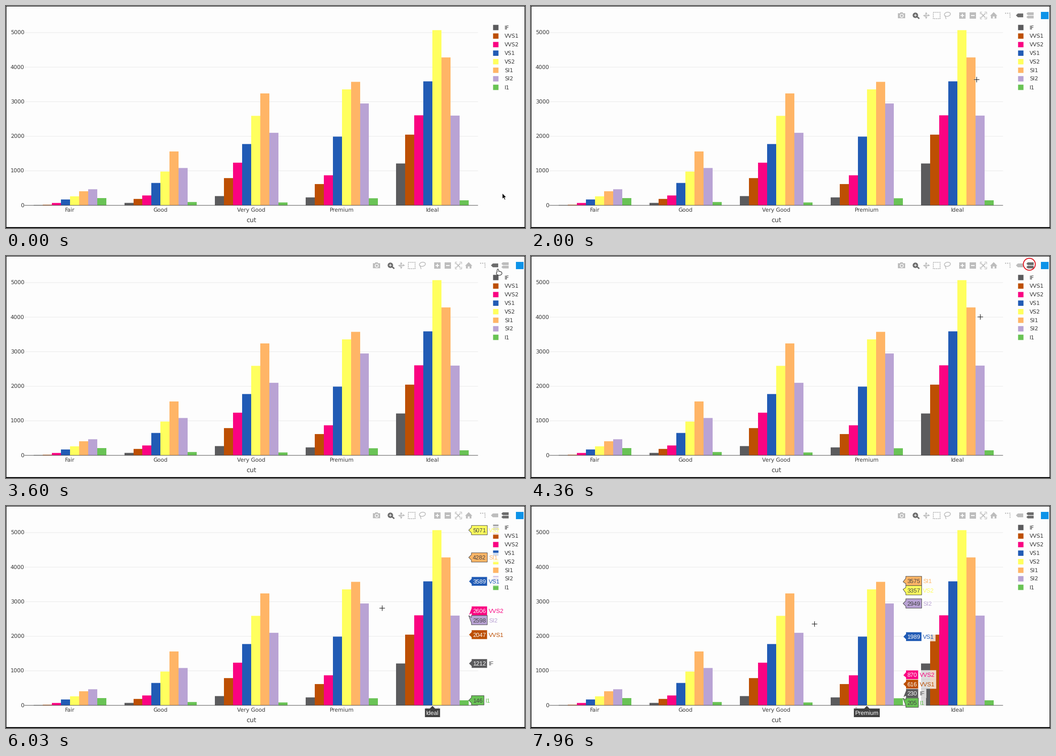
These frames come from a looping animation (1143x490 px, 8000 ms). A matplotlib script:

```python
import itertools

import matplotlib.pyplot as plt
import numpy as np
from matplotlib.animation import FuncAnimation
from matplotlib.lines import Line2D
from matplotlib.patches import Circle, Ellipse, Polygon, Rectangle
from matplotlib.text import Text
from matplotlib.transforms import Affine2D

W, H, DPI = 1143, 490, 64
PX = 72 / DPI
LOOP, STEP = 8000, 20

BG, INK, DARK = "#fdfdfd", "#3a3a3a", "#444444"
IDLE, ACTIVE = "#bdbdbd", "#6c6c6c"

# Diamonds counted by clarity, one row per cut
CLARITY = ["IF", "VVS1", "VVS2", "VS1", "VS2", "SI1", "SI2", "I1"]
COLORS = ["#5b5b5d", "#bd4f03", "#fa0382", "#215bb5",
          "#ffff5e", "#ffb566", "#b9a3d4", "#69c355"]
COUNTS = {
    "Fair": [9, 17, 69, 170, 261, 408, 466, 210],
    "Good": [71, 186, 286, 648, 978, 1560, 1081, 96],
    "Very Good": [268, 789, 1235, 1775, 2591, 3240, 2100, 84],
    "Premium": [230, 616, 870, 1989, 3357, 3575, 2949, 205],
    "Ideal": [1212, 2047, 2606, 3589, 5071, 4282, 2598, 146],
}
CUTS = list(COUNTS)

LEFT, RIGHT, BASE = 41, 1039, 440
GROUP = (RIGHT - LEFT) / len(CUTS)
BAR = 0.8 * GROUP / len(CLARITY)

plt.rcParams["text.hinting"] = "none"
fig = plt.figure(figsize=(W / DPI, H / DPI), dpi=DPI, facecolor=BG)
ax = fig.add_axes([0, 0, 1, 1])
ax.set(xlim=(0, W), ylim=(H, 0))
ax.axis("off")
layer = itertools.count(1)


def put(artist):
    """Add an artist on top of everything placed so far."""
    artist.set_zorder(next(layer))
    ax.add_artist(artist)
    return artist


def box(x0, y0, x1, y1, color, **kw):
    return put(Rectangle((x0, y0), x1 - x0, y1 - y0, fc=color, lw=0,
                         snap=False, **kw))


def shape(points, color, edge="none", width=0, **kw):
    return put(Polygon(points, closed=True, fc=color, ec=edge,
                       lw=width * PX, **kw))


def stroke(points, color, width=1, **kw):
    xs, ys = zip(*points)
    return put(Line2D(xs, ys, color=color, lw=width * PX, **kw))


def mark(x, y, marker, size, color, width=0, **kw):
    return put(Line2D([x], [y], marker=marker, ms=size * PX, color=color,
                      mew=width * PX, ls="none", **kw))


def write(x, y, s, size=12, color=INK, ha="left", font="DejaVu Sans"):
    """Text with its capitals centred on y."""
    return put(Text(x, y + 0.36 * size, s, fontsize=size * PX, color=color,
                    ha=ha, va="baseline", fontfamily=font))


def text_width(text):
    return text.get_window_extent().width


def x_mid(cut):
    return LEFT + GROUP * (cut + 0.5)


def right_edge(cut, k):
    return x_mid(cut) + (k - 3) * BAR


def y_of(count):
    return BASE - 0.07625 * count


# Chart

for value in range(0, 6000, 1000):
    y = y_of(value)
    if value:
        stroke([(LEFT, y), (RIGHT, y)], "#e9e9e9", snap=False)
    write(40.3, y + 0.2, str(value), ha="right")

for i, (cut, row) in enumerate(COUNTS.items()):
    for k, count in enumerate(row):
        right = right_edge(i, k)
        box(round(right - BAR), y_of(count), round(right), BASE, COLORS[k])
    write(x_mid(i), 449.1, cut, ha="center")
stroke([(LEFT, BASE), (RIGHT, BASE)], DARK, snap=False)
write((LEFT + RIGHT) / 2, 472.6, "cut", 14, ha="center")

for k, name in enumerate(CLARITY):
    y = 47.5 + 18.86 * k
    box(1072.7, y - 5.9, 1084.6, y + 5.9, COLORS[k])
    write(1098, y + 0.3, name)


# Toolbar

MID = 20.7


def tag(x, y, w, h):
    n = h / 2
    return shape([(x, y), (x + n, y - n), (x + w, y - n),
                  (x + w, y + n), (x + n, y + n)], IDLE)


def camera(x):
    return [box(x - 8, 16, x + 8, 27, IDLE), box(x - 3, 14, x + 3, 16, IDLE),
            mark(x, MID, "o", 8.4, BG), mark(x, MID, "o", 5.2, IDLE)]


def magnifier(x):
    return [stroke([(x, MID), (x + 7, 27)], ACTIVE, 3),
            mark(x - 1, 19.5, "o", 12, ACTIVE),
            mark(x - 1, 19.5, "+", 6, BG, 1.3)]


def pan(x):
    heads = zip("><v^", [5.5, -5.5, 0, 0], [0, 0, 5.5, -5.5])
    return [mark(x, MID, "+", 11, IDLE, 1.6)] + [
        mark(x + dx, MID + dy, head, 5, IDLE) for head, dx, dy in heads]


def lasso(x):
    return [put(Ellipse((x, 18.3), 13.5, 9, angle=-12, fill=False, ec=IDLE,
                        lw=1.6 * PX)),
            stroke([(x - 5, 21.5), (x - 3, 28)], IDLE, 1.6)]


def sign_button(x, sign):
    return [mark(x, MID, "s", 14, IDLE), mark(x, MID, sign, 8, BG, 2)]


def expand(x):
    parts = [mark(x, MID, "x", 10, IDLE, 1.8)]
    for sx, sy in itertools.product((-1, 1), repeat=2):
        corner = [(7.3, 3.5), (7.3, 7.3), (3.5, 7.3)]
        parts.append(stroke([(x + sx * u, MID + sy * v) for u, v in corner],
                            IDLE, 1.3))
    return parts


def home(x):
    return [shape([(x - 8, MID + 1), (x, 13.5), (x + 8, MID + 1)], IDLE),
            box(x - 6, MID, x + 6, 27.5, IDLE), box(x - 2, 23, x + 2, 27.5, BG)]


closest_icon = tag(1068, MID, 16, 8.4)
compare_icons = [tag(1091, MID + dy, 16, 6) for dy in (-3.7, 3.7)]
toolbar = [
    *camera(816), *magnifier(847), *pan(870),
    put(Rectangle((886, 13.5), 15, 14.5, fill=False, ec=IDLE, lw=1.9 * PX,
                  ls=(0, (1.5, 0.8)))),
    *lasso(917), *sign_button(950, "+"), *sign_button(973, "_"),
    *expand(995.8), *home(1019),
    stroke([(1044, 16), (1055, 16), (1055, 28)], IDLE, 2.4, ls=(0, (1, 0.9))),
    closest_icon, *compare_icons,
    box(1123, 13, 1140, 29, "#0d93e8"),
]

ring = put(Circle((1097.5, 18.2), 13.2, fill=False, ec="#e0141f", lw=2 * PX))


# Hover labels

LABEL_H = 20.5
LABEL_FONT = dict(size=13, font="Liberation Sans")


def label(x, y, text, k, shift=0):
    """Pointed tag with its tip at (x, y) and the series name beside it."""
    ink, edge = (BG, BG) if k < 4 else (DARK, DARK)
    mid, half = y + shift, LABEL_H / 2
    left = x + 6
    value = write(left + 3, mid, text, color=ink, **LABEL_FONT)
    end = left + text_width(value) + 6
    name = write(end + 3, mid, CLARITY[k], color=COLORS[k], **LABEL_FONT)
    back = box(end, mid - half, end + text_width(name) + 6, mid + half, BG,
               alpha=0.8)
    body = shape([(x, y), (left, mid + 6), (left, mid + half), (end, mid + half),
                  (end, mid - half), (left, mid - half), (left, mid - 6)],
                 COLORS[k], edge, 1)
    for text_part in (value, name):
        text_part.set_zorder(next(layer))
    return [back, body, value, name]


def spread(ys):
    """Push neighbouring labels apart until none overlap."""
    ys = np.array(ys, float)
    for _ in range(200):
        for i in range(len(ys) - 1):
            push = max(0, LABEL_H - ys[i + 1] + ys[i]) / 2
            ys[i] -= push
            ys[i + 1] += push
    return ys


def axis_label(cut):
    x, tip = x_mid(cut), BASE + 0.5
    top, bottom = tip + 6, tip + 26
    text = write(x, (top + bottom) / 2, CUTS[cut], color=BG, ha="center",
                 **LABEL_FONT)
    half = text_width(text) / 2 + 3
    body = shape([(x, tip), (x + 6, top), (x + half, top), (x + half, bottom),
                  (x - half, bottom), (x - half, top), (x - 6, top)],
                 "#404040", BG, 1)
    text.set_zorder(next(layer))
    return [body, text]


def single(cut, series):
    i, k = CUTS.index(cut), CLARITY.index(series)
    count = COUNTS[cut][k]
    return label(right_edge(i, k), y_of(count), f"({cut}, {count})", k)


def compare(cut):
    i, row = CUTS.index(cut), COUNTS[cut]
    order = sorted(range(len(row)), key=lambda k: -row[k])
    tips = [y_of(row[k]) for k in order]
    parts = axis_label(i)
    for k, y, mid in zip(order, tips, spread(tips)):
        parts += label(right_edge(i, 7), y, str(row[k]), k, mid - y)
    return parts


HOVERS = [
    (600, 1060, single("Ideal", "I1")),
    (1130, 1860, single("Ideal", "SI2")),
    (2180, 2700, single("Ideal", "VS2")),
    (2860, 3430, single("Ideal", "SI1")),
    (4480, 6060, compare("Ideal")),
    (6060, LOOP, compare("Premium")),
]


# Pointer

spot = Affine2D()
place = dict(transform=spot + ax.transData)
arrow = [shape([(0, 0), (0, 13), (3, 10.4), (5, 15), (7.2, 14), (5.2, 9.6),
                (9, 9.4)], "black", "white", 1, **place)]
cross = [mark(0, 0, "+", 12, color, width, **place)
         for color, width in (("#ffffffa0", 2.6), ("#1c1c1c", 1.2))]
hand = [put(Ellipse(center, w + grow, h + grow, fc=color, lw=0, **place))
        for color, grow in (("#333333", 2.6), ("white", 0))
        for center, w, h in (((-2.3, -2), 2.4, 9), ((0.5, 2.3), 11, 7.5))]

START = (1093, 413)
# Each move: start ms, end ms, destination
MOVES = [
    (30, 640, (1017, 429)),
    (1000, 1200, (988, 330)),
    (1760, 2000, (981, 162)),
    (2000, 2260, (952, 110)),
    (2600, 3100, (970, 190)),
    (3360, 3660, (1099, 18)),
    (4200, 4400, (976, 148)),
    (4400, 5000, (966, 204)),
    (5760, 6140, (785, 231)),
    (7800, 7960, (624, 260)),
]


def ramp(t, start, end):
    return float(np.clip((t - start) / (end - start), 0, 1))


def pointer_at(t):
    pos = np.array(START, float)
    for start, end, goal in MOVES:
        s = ramp(t, start, end)
        pos += (goal - pos) * s * s * (3 - 2 * s)
    return pos


def show(parts, on):
    for part in parts:
        part.set_visible(on)


# Window edges
for edges in ((0, 0, W, 1), (0, 0, 1, H), (W - 1, 0, W, H), (0, H - 2, W, H)):
    box(*edges, "black")


def update(n):
    t = n * STEP
    x, y = pointer_at(t)
    spot.clear().translate(x, y)
    show(hand, y < 45)
    show(arrow, y >= 45 and x > RIGHT)
    show(cross, y >= 45 and x <= RIGHT)

    for start, end, parts in HOVERS:
        show(parts, start <= t < end)

    fade = ramp(t, 100, 340)
    for icon in toolbar:
        icon.set_alpha(fade)
    comparing = t >= 4120
    closest_icon.set_facecolor(IDLE if comparing else ACTIVE)
    for icon in compare_icons:
        icon.set_facecolor(ACTIVE if comparing else IDLE)

    ring.set_alpha(ramp(t, 4180, 4280) * (1 - ramp(t, 5030, 5200)))
    return []


anim = FuncAnimation(fig, update, frames=LOOP // STEP, interval=STEP,
                     init_func=lambda: [], repeat=True, repeat_delay=0)
plt.show()
```
